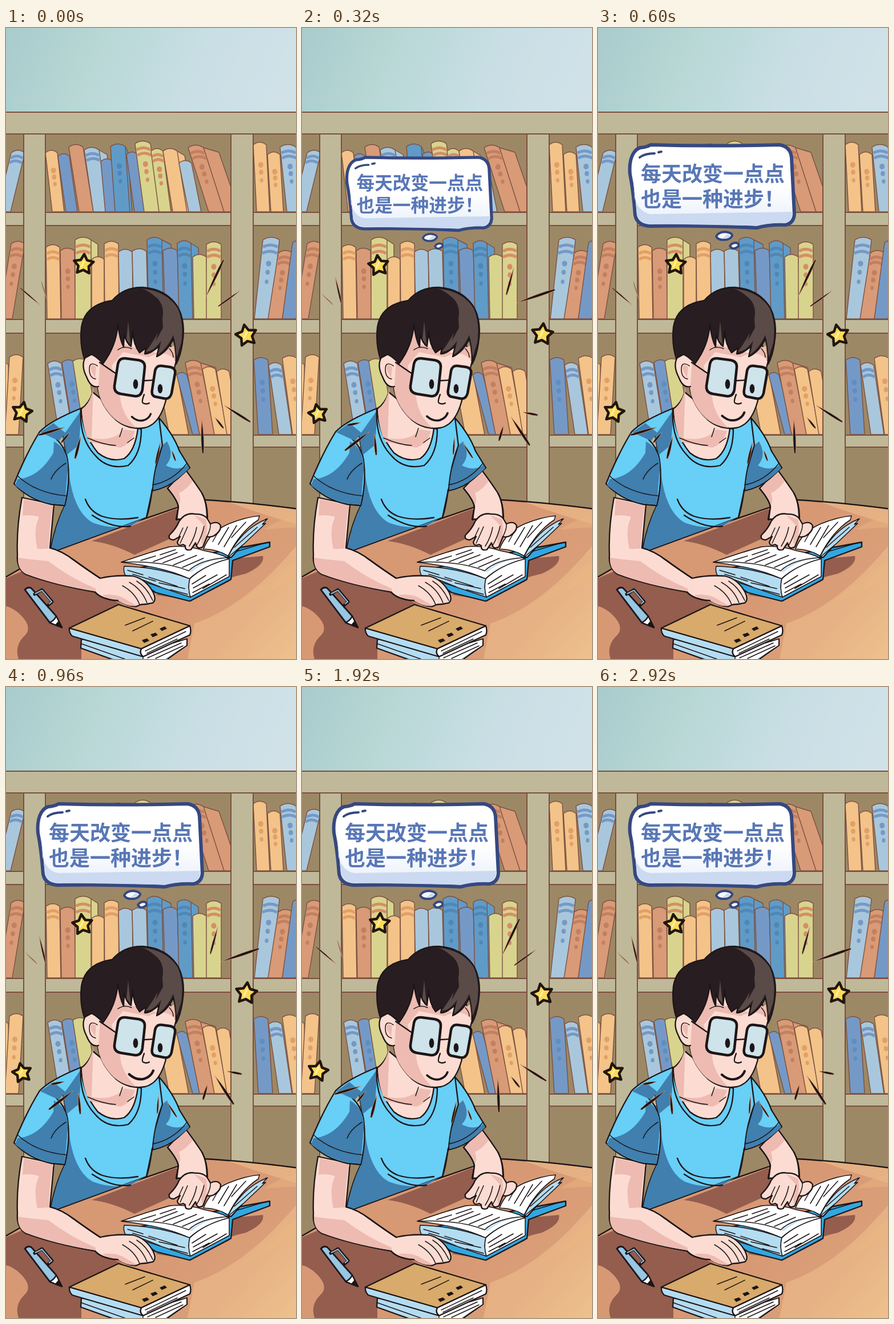
An HTML page for the animation above (3 s loop, 508 by 1102 pixels).

```html
<!DOCTYPE html>
<html lang="zh-CN">
<head>
<meta charset="utf-8">
<style>
html, body { margin: 0; width: 100%; height: 100%; overflow: hidden; background: #9d8866; }
svg { display: block; width: 100%; height: 100%; }
.l { stroke: #1d1517; stroke-width: 2.3; stroke-linejoin: round; stroke-linecap: round; }
.n { fill: none; }
.t { stroke-width: 1.5; }
.skin { fill: #fcdcd2; }
.shade { fill: #edbbb1; }
.blue { fill: #68cff7; }
.navy { fill: #407fae; }
.page { fill: #fff; }
.edge { fill: #b4dcf0; }
.ink { stroke: #364880; stroke-linejoin: round; stroke-linecap: round; }
text { font: 700 36px "Noto Sans CJK SC", "Noto Sans CJK", sans-serif; fill: #5877b6; }
</style>
</head>
<body>
<svg viewBox="0 0 508 1102" preserveAspectRatio="none">
<defs>
  <linearGradient id="wall" x2="1" y2=".12">
    <stop stop-color="#a9cbcc"/><stop offset=".32" stop-color="#b7d7d5"/>
    <stop offset=".72" stop-color="#c9dfe5"/><stop offset="1" stop-color="#d0e1e8"/>
  </linearGradient>
  <linearGradient id="desk" gradientUnits="userSpaceOnUse" x1="300" y1="930" x2="500" y2="1110">
    <stop stop-color="#d79874"/><stop offset=".55" stop-color="#da9f78"/><stop offset="1" stop-color="#eec68f"/>
  </linearGradient>
  <linearGradient id="bub" x2="0" y2="1">
    <stop offset=".5" stop-color="#fff"/><stop offset=".84" stop-color="#eef3fb"/><stop offset="1" stop-color="#cad9f1"/>
  </linearGradient>
</defs>
<rect width="508" height="148" fill="url(#wall)"/>
<rect y="147" width="508" height="800" fill="#9d8866"/>
<g id="books" stroke="#7c5140" stroke-width="1.4" stroke-linejoin="round"></g>
<g id="shelves" fill="#bfb999" stroke="#7c4f3f" stroke-width="2"></g>

<!-- desk -->
<path class="l" fill="url(#desk)" d="M-4 961L76 915L298 838L346 824Q420 828 512 840V1106H-4Z"/>
<path fill="#efbf8c" opacity=".6" d="M390 828Q460 834 508 841V866Q450 850 390 828ZM508 905Q420 1010 330 1040L318 1102H508Z"/>
<path fill="#e9b582" opacity=".45" d="M508 850Q470 862 452 876L508 872ZM508 930Q440 975 410 1010L508 960Z"/>
<path fill="#945d4e" d="M0 961L30 948L160 985L205 1008L122 1046L114 1056L132 1068V1102H22Q14 1078 34 1060Q48 1044 20 1020Q8 1011 0 1010ZM150 896L298 840L318 858L285 893L225 920Q186 900 150 896ZM262 990L395 927L450 922Q454 938 420 953Q370 965 392 966L325 1000Z"/>

<!-- right arm -->
<path class="l skin" d="M283 804Q300 824 302 836L298 858L352 856Q352 828 343 812Q332 795 314 771Z"/>
<path class="shade" d="M285 804L314 773L327 791Q316 807 303 812Q308 826 302 834Q300 824 285 804Z"/>

<!-- open book -->
<path class="l" fill="#31a7e2" d="M207 948L262 986L322 1001L394 963L397 930L462 906V898L385 912Z"/>
<path class="l edge" d="M390 925L396 906L456 858L447 866L395 924Z"/>
<path class="l page t" d="M202 933Q250 916 287 906Q325 904 391 927Q345 940 321 962Q280 942 202 933Z"/>
<path class="l edge t" d="M207 940Q270 942 322 962Q318 977 323 994L209 956Q205 948 207 940Z"/>
<path class="l page t" d="M322 962Q347 938 391 927V958L323 994Q318 977 322 962Z"/>
<path class="edge" d="M224 932Q290 930 325 951Q346 930 386 926L347 912Z" opacity=".7"/>
<path class="l page t" d="M202 933Q250 916 287 906Q318 903 348 913Q374 918 388 925Q340 928 320 948Q275 930 202 933Z"/>
<path class="l edge t" d="M388 925Q412 875 458 857L449 867L455 865L418 900Z"/>
<path class="l page t" d="M346 910Q357 880 390 866Q420 854 444 852L442 859Q410 880 389 922Q370 910 346 910Z"/>
<path class="l n t" d="M236 930L262 922M258 932L300 916M275 934L312 920M293 938L334 921M309 942L346 926M270 920L297 911M372 902L390 872M382 906L404 869M362 897L374 876M395 890L420 863M213 947L240 955M222 954L262 966M250 959L300 975M268 969L313 979M240 964L270 976M288 981L318 989M326 971L350 956M328 978L370 955M327 986L356 971M345 979L386 955M400 907L440 872M404 914L455 899"/>

<!-- right hand -->
<path class="l skin" d="M303 862Q314 845 332 849Q344 848 352 856L358 866Q371 860 376 869Q377 879 364 887Q357 890 352 888L345 906Q337 911 334 905L332 899L324 911Q313 914 314 904L310 902Q302 906 300 898L305 888L294 894Q284 894 286 886Q299 873 303 862Z"/>
<path class="shade" d="M330 851L350 858Q354 870 350 888L344 904Q338 882 349 871Z"/>
<path class="l n t" d="M318 871Q312 885 305 900M334 872Q331 889 321 905M347 870Q344 886 334 904M358 866Q359 875 352 888M310 873L303 888"/>
<path class="l n" d="M283 804Q300 824 302 836L299 859M343 812Q353 830 353 856"/>

<!-- shirt body -->
<path class="l blue" d="M132 664L96 690L108 756L103 834Q85 870 77 917L246 855L256 808L280 720L268 681L232 700Z"/>
<path class="navy" d="M104 832L110 775Q118 845 152 864Q185 876 218 870L240 857L78 915Q85 871 104 832ZM132 667L128 728L106 746L100 712Z"/>
<path class="l n" d="M139 823Q147 845 169 853Q195 861 231 855M151 851Q188 875 218 870M256 806Q252 838 246 855"/>
<path class="l blue" d="M268 681Q294 711 304 739L322 768L301 787Q283 803 257 808Q259 768 274 729Z"/>
<path class="navy" d="M258 807Q260 767 275 728L282 722Q296 747 280 764Q302 775 318 763L321 769Q290 800 258 807Z"/>
<path class="l n t" d="M257 798Q293 791 317 760M274 729L262 770"/>

<!-- left arm -->
<path class="l skin" d="M28 820Q18 874 20 920Q18 943 34 954Q85 973 156 985Q167 998 196 1000Q218 1012 229 1010L236 1007L247 1006L257 1004Q264 999 258 986Q245 962 222 957Q190 955 165 961Q145 948 120 930Q98 913 77 908L84 832Z"/>
<path class="shade" d="M31 823L83 834Q76 862 75 909L55 910Q47 876 58 854Q44 849 29 852ZM21 925Q40 928 74 931Q112 960 157 979V984Q86 973 34 953Q20 945 21 925ZM168 990Q190 988 205 995L229 1009Q214 1012 196 1000Q178 998 168 990Z"/>
<path class="l n" d="M77 908Q98 913 120 930Q145 948 165 961M156 985Q167 998 196 1000"/>
<path class="l n t" d="M204 974Q226 986 234 1007M216 968Q238 980 247 1004M229 966Q247 977 257 1000"/>

<!-- left sleeve and collar -->
<path class="l blue" d="M132 664Q79 685 59 705Q36 742 14 796Q40 824 80 832L103 834Q113 792 108 757Q104 732 88 718"/>
<path class="navy" d="M84 722Q111 737 108 772L103 832Q60 834 16 799L20 788Q58 785 83 742ZM60 706L83 690L104 707L93 721Z"/>
<path class="l n t" d="M20 782Q52 812 105 817M105 760Q85 772 79 788"/>
<path class="l blue" d="M131 665Q128 716 155 745Q178 773 214 764Q237 744 237 701Z"/>
<path class="l skin" d="M152 636Q146 655 132 665Q133 708 161 742Q182 759 207 752Q226 739 231 700Z"/>
<path class="shade" d="M153 628Q148 655 133 666Q134 700 146 723L200 733Q219 727 226 704L207 701Q188 723 150 716Z"/>
<path class="l n t" d="M143 716Q170 728 192 729M213 724L224 716M204 699L199 714"/>

<!-- head -->
<path class="l skin" d="M160 570Q161 615 161 631Q168 662 192 684Q215 703 244 698Q268 692 279 654L298 582L275 520H190Z"/>
<path class="shade" d="M161 585L196 530L208 552L218 556L236 560L264 568L294 555L297 580Q278 560 250 575L205 566L185 590L200 645Q203 675 228 698Q198 695 180 672Q164 652 161 630Z"/>
<path class="l skin" d="M165 576Q150 564 139 575Q131 590 141 609Q149 630 162 626"/>
<path class="l n t" d="M160 590Q146 581 146 596Q146 611 157 613"/>
<path class="shade" d="M158 592Q148 584 148 596L156 611Z"/>
<path class="l" fill="#281e21" d="M170 586Q160 575 150 570L137 577Q129 552 132 523Q138 483 186 476Q207 452 240 453Q282 456 302 489Q315 515 309 550Q306 572 298 587Q299 562 293 543Q283 565 264 574L268 556Q252 570 243 569L245 559L234 567Q223 553 222 529L219 556Q211 551 207 535L206 557Q199 543 196 518Q193 556 170 586Z"/>
<path fill="#5b4b48" d="M238 455Q282 460 301 490Q312 516 307 550L299 575Q297 550 293 536Q283 559 266 571L272 546Q258 566 245 565Q269 534 274 508Q279 481 260 468Q250 459 238 455ZM214 512L218 553L211 544Z"/>
<path fill="#281e21" d="M262 470Q274 490 275 524L262 547Q273 512 258 491Z"/>
<path class="l n t" d="M196 562Q207 554 220 560M286 560Q293 567 293 575"/>
<path class="l n" stroke-width="4" d="M164 584L193 604M241 616L257 615"/>
<g fill="#cee3ea" stroke="#1d1517" stroke-width="4.5">
  <path d="M209 577L232 580Q244 582 243 593L239 631Q237 644 226 643L201 639Q189 637 190 625L196 587Q198 576 209 577Z"/>
  <path d="M272 590L287 592Q298 594 296 604L290 638Q287 649 277 647L262 644Q254 642 256 632L261 599Q263 589 272 590Z"/>
</g>
<path class="l n" d="M242 640Q237 653 240 655Q246 658 251 655"/>
<g fill="#1d1517"><ellipse cx="227" cy="622" rx="4.3" ry="8.5"/><ellipse cx="270" cy="630" rx="4.3" ry="8"/></g>
<path id="mouth" class="l n" style="stroke-width:3.4" d="M-17 0Q-7 9 4 6Q13 3 16 -5"/>

<!-- pen -->
<path class="l" fill="#78add2" d="M33 981Q39 974 45 979L88 1027L98 1047L77 1039Z"/>
<path class="edge" d="M36 982L42 979L86 1028L78 1036Z" opacity=".55"/>
<path class="page" d="M78 1037L88 1028L94 1039L89 1043Z"/>
<path class="l n" d="M33 981Q39 974 45 979L88 1027L98 1047L77 1039ZM76 1038Q84 1036 88 1027"/>
<path class="l" fill="#1d1517" d="M92 1037L98 1047L87 1043Z"/>
<path class="l n" stroke="#26313f" style="stroke-width:5" d="M50 989L63 981L81 1002L74 1008"/>
<path class="n" stroke="#8fbedc" stroke-width="2" d="M51 988L63 982L80 1002L75 1006"/>

<!-- closed books -->
<path class="l edge" d="M132 1067L131 1083L190 1104H280L317 1078V1067L238 1090Z"/>
<path class="page" d="M240 1091L316 1068V1078L275 1104H240Z"/>
<path class="l n t" d="M131 1075L208 1102M240 1094V1104M248 1100L307 1074M262 1101L310 1079"/>
<path class="l page" d="M237 1084L322 1044Q325 1053 322 1060L240 1098Q233 1092 237 1084Z"/>
<path class="l edge" d="M111 1048Q110 1056 116 1062L240 1098Q233 1092 237 1084Z"/>
<path class="l" fill="#d8aa6b" d="M197 1007L322 1044L237 1084L111 1048Z"/>
<path class="l n t" d="M209 1043L243 1030M222 1053L257 1036M244 1088L315 1054M247 1092L300 1067"/>
<path fill="#1d1517" d="M238 1069L247 1066L251 1070L242 1074ZM253 1059L262 1056L266 1060L257 1064ZM269 1049L278 1045L282 1049L273 1053Z"/>

<g id="sparkA"></g>
<g id="sparkB"></g>

<g id="bubble">
  <g class="ink">
    <path fill="url(#bub)" stroke-width="6" d="M74 209Q86 208 92 204Q200 207 318 204Q337 207 339 226L344 325Q343 341 328 344Q300 343 278 349Q180 344 91 346Q69 345 65 327Q62 285 56 255Q54 232 62 219Q67 211 74 209Z"/>
    <path fill="#cbdaf1" stroke="none" d="M61 250L64 297Q72 322 92 325L340 321Q341 338 326 340Q300 340 278 345L91 342Q72 340 68 325Z"/>
    <path class="n" stroke-width="4" d="M73 226Q82 219 99 219M106 217L111 216"/>
    <path fill="#f5f9ff" stroke-width="4" d="M207 364Q211 356 223 356Q236 358 235 363Q230 371 219 370Q210 370 207 364ZM231 381Q234 375 242 375Q248 377 246 381Q241 386 235 385Z"/>
    <path fill="#cbdaf1" stroke="none" d="M218 367L227 360L232 363Q228 369 218 367Z"/>
  </g>
  <text x="75" y="268">每天改变一点点</text>
  <text x="75" y="312">也是一种进步！</text>
</g>
</svg>
<script>
const $ = id => document.getElementById(id);
const color = { o: '#f3c389', b: '#7599c6', s: '#d99a77', l: '#a9c7dc', g: '#d8d48d', d: '#609bc8' };
const trim = { o: '#e2a066', b: '#5d8fc0', s: '#c28060', l: '#7599c6', g: '#d78d68', d: '#4f87b8' };

// x, y and width of the top, drift of the foot, colour, marks (= bands, . dots), side face
function book(base, [x, y, w, lean, c, marks = '', side = 0]) {
  const at = (u, v) => `${x + u * w + lean * v} ${y + (base - y) * v}`;
  let s = '';
  if (side) s += `<path fill="${color[c]}" d="M${at(1, 0)}L${x + w + side} ${y + 8}L${x + w + side + lean} ${base}H${x + lean}Z"/>`;
  s += `<path fill="${color[c]}" d="M${at(0, 1)}L${at(0, 0)}Q${x + w / 2} ${y - 9} ${x + w} ${y}L${at(1, 1)}Z"/>`;
  if (marks.includes('=')) for (const v of [.09, .17])
    s += `<path fill="none" stroke="${trim[c]}" stroke-width="5" d="M${at(.05, v)}Q${x + w / 2 + lean * v} ${y + (base - y) * v - 7} ${at(.95, v)}"/>`;
  if (marks.includes('.')) [.3, .41, .53].forEach((v, i) => {
    const [cx, cy] = at(.5, v).split(' ');
    s += `<ellipse cx="${cx}" cy="${cy}" rx="${4.5 - i * .7}" ry="${5 - i * .6}" fill="${trim[c]}" stroke="none"/>`;
  });
  return s;
}
const row = (base, list) => { $('books').innerHTML += list.map(b => book(base, b)).join(''); };

row(321, [[69, 218, 21, 12, 'o', '.'], [91, 224, 20, 14, 'b'], [110, 208, 25, 18, 's'],
  [137, 213, 26, 16, 'l', '=', 14], [166, 233, 21, 8, 'b'], [183, 207, 26, 8, 'd', '.', 4],
  [211, 221, 20, 14, 'b'], [226, 202, 27, 16, 'g', '=.'], [254, 215, 21, 14, 'g', '=.'],
  [275, 215, 25, 17, 'o', '', 13], [303, 236, 22, 17, 'l'], [319, 209, 27, 36, 's', '=.', 27]]);
row(508, [[70, 383, 24, 2, 'o', '='], [95, 389, 25, 2, 's', '.'], [121, 370, 28, 0, 'g', '=', 12],
  [150, 404, 22, 0, 'o'], [172, 377, 25, 1, 'o', '='], [197, 391, 24, 2, 'l'],
  [221, 390, 25, 3, 'l'], [247, 370, 26, 3, 'd', '=.', 16], [275, 389, 25, 4, 'b'],
  [300, 376, 24, 3, 'd', '=.', 13], [327, 400, 24, 2, 'g'], [351, 378, 26, 0, 'g', '=.']]);
row(710, [[73, 586, 24, 20, 'l', '=.'], [98, 584, 23, 20, 'b', '.'], [117, 582, 25, 20, 'g'],
  [266, 605, 34, 20, 'o'], [299, 606, 18, 28, 'b'], [314, 585, 27, 25, 's', '=.', 26],
  [344, 596, 23, 21, 'o', '.'], [369, 600, 22, 18, 'o']]);
row(321, [[9, 218, 24, -25, 'l', '='], [433, 204, 23, 6, 'o', '.'], [458, 221, 22, 6, 'o', '.'], [480, 208, 28, 12, 'l', '=.']]);
row(508, [[9, 377, 24, -22, 's', '=.'], [450, 370, 29, -15, 'l', '=.'], [477, 393, 25, -18, 's', '=.'], [502, 375, 24, -18, 'b']]);
row(710, [[-18, 588, 22, 2, 'o'], [6, 575, 24, -8, 'o', '.'], [434, 580, 25, 8, 'b', '.'], [460, 589, 23, 18, 'l', '='], [484, 577, 26, 18, 'o', '.']]);

const bar = (x, y, w, h) => `<rect x="${x}" y="${y}" width="${w}" height="${h}"/>`;
$('shelves').innerHTML = [[322, 23], [509, 24], [711, 21]].map(([y, h]) => bar(-5, y, 520, h)).join('')
  + bar(31, 180, 38, 790) + bar(394, 180, 39, 660) + bar(-5, 147, 520, 38);

const dash = ([x1, y1, x2, y2, w]) => {
  const k = w / Math.hypot(x2 - x1, y2 - y1), nx = (y1 - y2) * k, ny = (x2 - x1) * k;
  const mx = x1 * .4 + x2 * .6, my = y1 * .4 + y2 * .6;
  return `<path fill="#1d1314" stroke="#d99a78" stroke-width=".7" d="M${x1} ${y1}Q${mx + nx} ${my + ny} ${x2 + nx / 3} ${y2 + ny / 3}L${x2 - nx / 3} ${y2 - ny / 3}Q${mx - nx} ${my - ny} ${x1} ${y1}Z"/>`;
};
const star = ([x, y, r, turn]) => {
  const pts = Array.from({ length: 10 }, (_, i) => {
    const a = i * Math.PI / 5 + turn, q = i % 2 ? r * .53 : r;
    return `${x + q * Math.sin(a)},${y - q * Math.cos(a)}`;
  }).join(' ');
  return `<polygon points="${pts}" fill="#fbdb5b" stroke="#21150f" stroke-width="4.5" stroke-linejoin="round"/>`
    + `<path d="M${x - 4} ${y + 4}L${x + 1} ${y - 6}" stroke="#fff3b0" stroke-width="2.5" stroke-linecap="round"/>`;
};
const sparks = (id, lines, stars) => { $(id).innerHTML = lines.map(dash).join('') + stars.map(star).join(''); };

sparks('sparkA', [[60, 484, 25, 454, 2], [71, 473, 62, 443, 1], [350, 470, 381, 405, 3.5], [411, 458, 372, 486, 2.4],
  [382, 659, 428, 688, 3.5], [366, 680, 381, 699, 3], [343, 683, 345, 743, 4], [104, 697, 57, 711, 4],
  [112, 706, 97, 724, 3], [131, 713, 121, 752, 4], [271, 722, 262, 761, 3], [290, 737, 297, 756, 2.5]],
  [[136, 413, 18, .06], [421, 537, 19, -.2], [28, 671, 18, .2]]);
sparks('sparkB', [[58, 434, 69, 481, 2.6], [33, 463, 54, 483, 1], [371, 419, 358, 466, 3], [376, 480, 443, 457, 4],
  [387, 671, 413, 676, 3.5], [353, 694, 345, 721, 3.5], [366, 679, 399, 729, 4], [103, 689, 79, 694, 3.5],
  [118, 705, 75, 738, 4], [127, 709, 130, 746, 3.5], [267, 714, 265, 745, 2.5], [282, 725, 299, 751, 2.5]],
  [[134, 415, 18, -.12], [421, 535, 19, .1], [28, 674, 17, -.2]]);

function draw(ms) {
  const t = Math.floor(ms % 3000 / 40) * 40;
  const pop = t < 400 ? t / 400 * 1.1 : Math.max(1, 1.1 - (t - 400) / 2000);
  $('bubble').setAttribute('transform', `translate(246 386) scale(${pop}) translate(-246 -386)`);
  const odd = Math.floor(t / 300) % 2;
  $('sparkA').style.display = odd ? 'none' : '';
  $('sparkB').style.display = odd ? '' : 'none';
  const smile = 1 - Math.abs(t % 2200 / 1100 - 1);
  $('mouth').setAttribute('transform', `translate(237.5 ${679 - 3 * smile}) scale(${1 + .32 * smile})`);
}
const start = performance.now();
(function tick() {
  draw(performance.now() - start);
  requestAnimationFrame(tick);
})();
</script>
</body>
</html>
```
